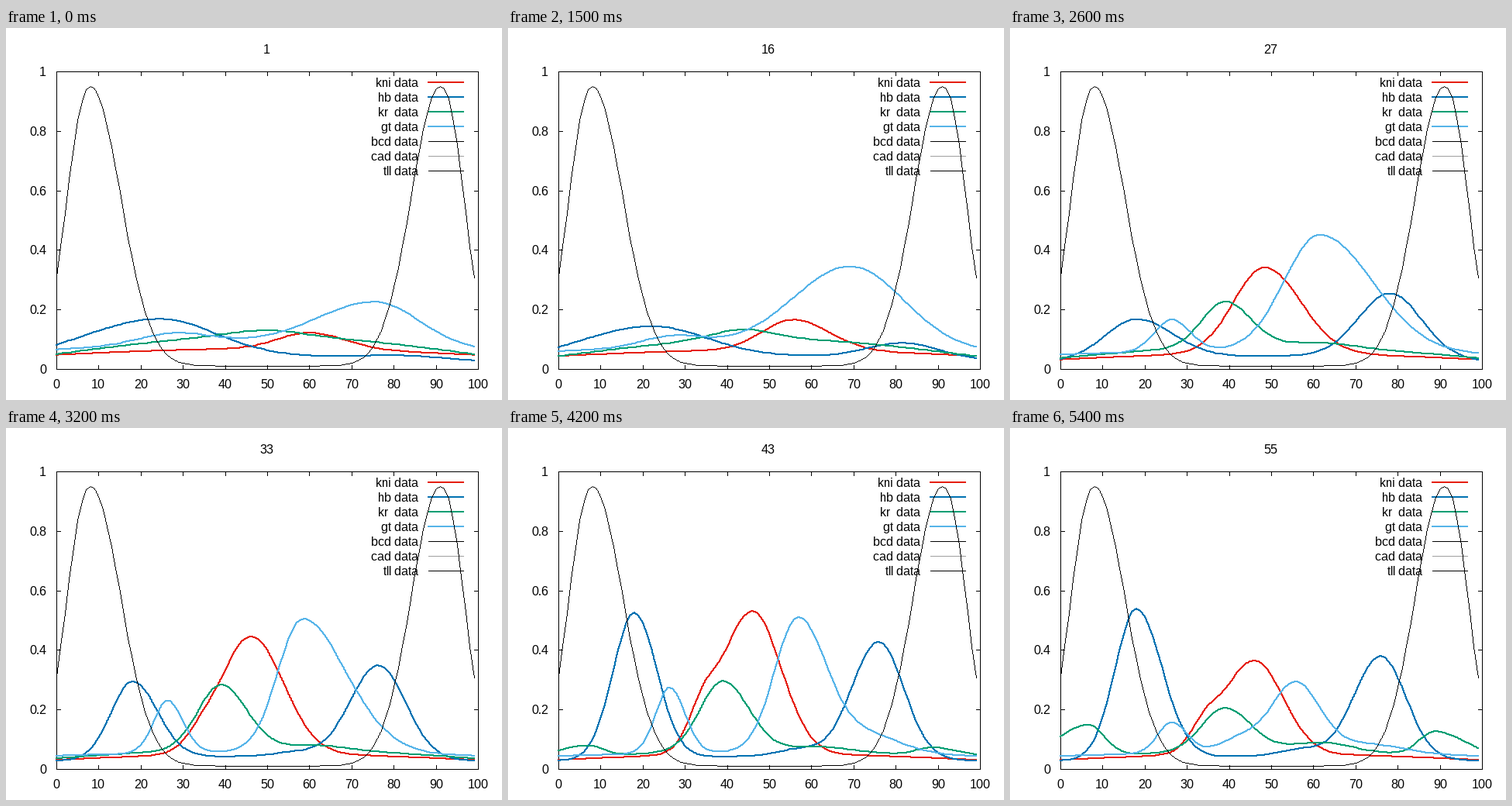
Write a matplotlib script that moves like this. It is 640 px wide and 480 px high and loops after 5.5 s.

```python
import numpy as np
import matplotlib.pyplot as plt
from matplotlib.animation import FuncAnimation

DPI = 100
W, H = 640, 480
LEFT, RIGHT, TOP, BOTTOM = 65, 609, 57, 441
FRAMES, INTERVAL = 55, 100
RED, BLUE, GREEN, SKY = "#e51e10", "#0072b2", "#009e73", "#56b4e9"

plt.rcParams.update({
    "font.family": "Liberation Sans",
    "font.size": 16 * 72 / DPI,
    "text.hinting": "default",
    "text.hinting_factor": 1,
})

cells = np.arange(100)
steps = np.arange(FRAMES)[:, None]


# Gene levels: rows are time steps, columns are positions.

def path(start, *moves):
    """A value that eases to a new level during each (begin, end, level)."""
    value = np.full(steps.shape, float(start))
    for begin, end, level in moves:
        t = np.clip((steps - begin) / (end - begin), 0, 1)
        value += (level - start) * t * t * (3 - 2 * t)
        start = level
    return value


def bump(center, height, left, right, left_power=2, right_power=2):
    """Bell with its own width and steepness on each side."""
    d = cells - center
    width = np.where(d < 0, left, right)
    power = np.where(d < 0, left_power, right_power)
    return height * np.exp(-np.abs(d / width) ** power / 2)


def dome(edge, rise):
    return edge + rise * np.sin(np.pi * cells / 99)


def kni():
    main = bump(path(60, (4, 34, 46)),
                path(.055, (8, 42, .485), (40, 66, .18)),
                7.3, path(8.5, (26, 38, 6.8)))
    shoulder = bump(34, path(0, (26, 42, .1), (44, 60, .05)), 3.2, 3.2)
    return dome(path(.048, (8, 30, .031)), .02) + main + shoulder


def hb():
    front = bump(path(24, (6, 26, 18)),
                 path(.13, (8, 18, .1), (22, 46, .52), (46, 60, .49)),
                 path(18, (10, 32, 5)),
                 path(13.5, (13, 36, 5.3), (40, 56, 6.1)))
    back = bump(path(82, (12, 36, 76)),
                path(.01, (8, 42, .39), (44, 60, .32)),
                path(8.5, (16, 38, 6.3)), path(9, (14, 38, 5.9)))
    middle = bump(57, path(0, (24, 38, .024)), 5, 5)
    return dome(.028, .015) + front + back + middle


def kr():
    main = bump(path(50, (2, 26, 39)),
                path(.02, (11, 38, .245), (38, 62, .11)),
                path(9, (6, 24, 5.4)), path(8, (6, 24, 6.1)))
    front = bump(6.5, path(0, (32, 58, .115)), 7.3, 3.9)
    back = bump(89, path(0, (32, 58, .088)), 3.9, 7.6)
    tail = bump(62, path(0, (14, 26, .014), (40, 56, .03)), 7, 7)
    floor = dome(path(.05, (0, 30, .036)), path(.06, (10, 40, .026)))
    return floor + main + front + back + tail


def gt():
    main = bump(path(76, (0, 38, 57), (38, 54, 55.7)),
                path(.135, (-4, 40, .47), (38, 62, .15)),
                path(13.5, (14, 34, 5.5)),
                path(10, (0, 18, 12.5), (26, 38, 6.6), (42, 54, 5.8)))
    width = path(8, (8, 32, 3.3))
    front = bump(path(28, (0, 26, 26.4)),
                 path(.036, (16, 40, .225), (40, 60, .07)),
                 width, width + .3)
    shoulder = bump(73, path(0, (26, 38, .065), (40, 54, .03)), 8, 8)
    middle = bump(43, path(0, (42, 56, .05)), 5, 5)
    floor = dome(path(.066, (4, 36, .044)), path(.025, (4, 30, .013)))
    return floor + main + front + shoulder + middle


def terminal():
    return (.0115 + bump(8, .94, 5.5, 7.17, left_power=2.2)
            + bump(91, .94, 6.9, 5.55, right_power=2.3))


# Drawing: hard-edged lines made of whole pixels.

def to_x(v):
    return np.rint(LEFT + v * (RIGHT - LEFT) / 100)


def to_y(v):
    return np.rint(BOTTOM - v * (BOTTOM - TOP))


def raster(xs, ys, width):
    """Pixels of a polyline drawn with a square brush."""
    px, py = [], []
    for x0, y0, x1, y1 in zip(xs, ys, xs[1:], ys[1:]):
        n = int(max(abs(x1 - x0), abs(y1 - y0))) + 1
        px.append(np.rint(np.linspace(x0, x1, n)))
        py.append(np.rint(np.linspace(y0, y1, n)))
    px, py = np.concatenate(px), np.concatenate(py)
    brush = [(i, j) for i in range(width) for j in range(width)]
    return (np.concatenate([px - i for i, _ in brush]),
            np.concatenate([py - j for _, j in brush]))


def line(xs, ys, color="black", width=1):
    return ax.plot(*raster(xs, ys, width), ls="none", marker=",", color=color)[0]


def label(x, y, text, align="center"):
    return ax.text(x, y, text, ha=align, va="baseline")


fig = plt.figure(figsize=(W / DPI, H / DPI), dpi=DPI, facecolor="white")
ax = fig.add_axes([0, 0, 1, 1])
ax.set_xlim(0, W)
ax.set_ylim(H, 0)
ax.axis("off")

for v in range(0, 101, 10):
    x = to_x(v)
    line([x, x], [BOTTOM, BOTTOM - 5])
    line([x, x], [TOP, TOP + 5])
    label(x, 465, str(v))
for i in range(6):
    y = to_y(i / 5)
    line([LEFT, LEFT + 5], [y, y])
    line([RIGHT, RIGHT - 5], [y, y])
    label(52, y + 5, f"{i / 5:g}", "right")
line([LEFT, RIGHT, RIGHT, LEFT, LEFT], [TOP, TOP, BOTTOM, BOTTOM, TOP])

legend = [("kni data", RED, 2), ("hb data", BLUE, 2), ("kr  data", GREEN, 2),
          ("gt data", SKY, 2), ("bcd data", "black", 1),
          ("cad data", "#a0a0a0", 1), ("tll data", "black", 1)]
for i, (name, color, width) in enumerate(legend):
    y = 71 + 19 * i
    label(532, y + 5, name, "right")
    line([545, 590], [y, y], color, width)

xs = to_x(cells)
genes = [(kni(), RED), (hb(), BLUE), (kr(), GREEN), (gt(), SKY)]
curves = [(line(xs, to_y(levels[0]), color, 2), levels)
          for levels, color in genes]
line(xs, to_y(terminal()))
title = label(336, 33, "1")


def update(n):
    for curve, levels in curves:
        curve.set_data(*raster(xs, to_y(levels[n]), 2))
    title.set_text(str(n + 1))
    return [curve for curve, _ in curves] + [title]


anim = FuncAnimation(fig, update, frames=FRAMES, interval=INTERVAL,
                     repeat=True, repeat_delay=0)
plt.show()
```
